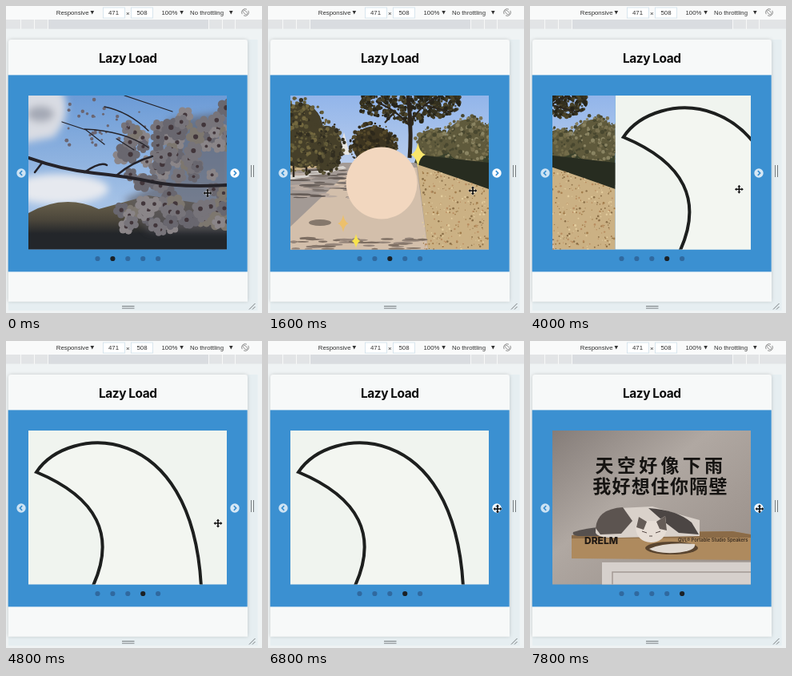
An HTML page that plays this animation: 320x384 px, repeating every 8 s.

```html
<!DOCTYPE html>
<html lang="en">
<head>
<meta charset="utf-8">
<title>Lazy Load</title>
<style>
  html, body { margin: 0; width: 100%; height: 100%; overflow: hidden; background: #fafafa; }
  svg { display: block; width: 100%; height: 100%; }
  text { font-family: Inter, Roboto, sans-serif; }
  .bar text { font: 7.8px "Liberation Sans", Arial, sans-serif; fill: #303030; }
  .mid { text-anchor: middle; }
  .title { font-size: 15.4px; font-weight: 700; letter-spacing: -.4px; }
  .cjk { font: bold 23px "Noto Sans CJK SC", "Noto Sans CJK", sans-serif; text-anchor: middle; fill: #161412; }
</style>
</head>
<body>
<svg viewBox="0 0 320 384">
  <defs>
    <clipPath id="window"><rect x="28" y="112" width="248" height="192.5"/></clipPath>
    <clipPath id="photo"><rect width="248" height="193"/></clipPath>
    <linearGradient id="sky" x2="0" y2="1">
      <stop stop-color="#6c9bd6"/><stop offset=".7" stop-color="#a5c2e6"/>
    </linearGradient>
    <linearGradient id="paleSky" x2="0" y2="1">
      <stop stop-color="#92b5ea"/><stop offset=".45" stop-color="#b9cdec"/>
    </linearGradient>
    <linearGradient id="hill" x2="0" y2="1">
      <stop stop-color="#716850"/><stop offset=".45" stop-color="#4b463b"/><stop offset=".7" stop-color="#23262a"/>
    </linearGradient>
    <linearGradient id="wall" x2="1" y2="1">
      <stop stop-color="#857d79"/><stop offset=".4" stop-color="#b0a8a2"/><stop offset="1" stop-color="#958b85"/>
    </linearGradient>
    <filter id="soft" x="-30%" y="-30%" width="160%" height="160%"><feGaussianBlur stdDeviation="5"/></filter>
    <filter id="shade"><feDropShadow dx="0" dy="0" stdDeviation="2" flood-opacity=".18"/></filter>
    <g id="arrow">
      <circle r="5.7" fill="#fff"/>
      <path d="M-1.2-2.8 1.6 0-1.2 2.8" fill="none" stroke="#3b90d1" stroke-width="1.7"/>
    </g>
    <path id="star" d="M0-1Q.15-.15.62 0 .15.15 0 1-.15.15-.62 0-.15-.15 0-1Z"/>
  </defs>

  <rect width="320" height="384" fill="#f9fafa"/>
  <g class="bar">
    <g fill="#fff" stroke="#cfe0ea" stroke-width=".8">
      <rect x="121.5" y="2" width="27" height="13"/><rect x="156.5" y="2" width="27" height="13"/>
    </g>
    <text x="62.8" y="11">Responsive</text>
    <text class="mid" x="134.5" y="11">471</text>
    <text class="mid" x="152.3" y="12">×</text>
    <text class="mid" x="170" y="11">508</text>
    <text x="194.5" y="11">100%</text>
    <text x="230" y="11">No throttling</text>
    <path d="M105.5 6h4.6l-2.3 4.4zM217.3 6h4.6l-2.3 4.4zM279 6h4.6l-2.3 4.4z" fill="#333"/>
    <g fill="none" stroke="#777" stroke-width=".8">
      <rect x="-1.6" y="-3" width="3.2" height="6" rx=".6" transform="translate(299 8)rotate(-45)"/>
      <path d="M295.2 10.200A4.300 4.300 0 0 1 301 4.200M302.800 5.800A4.300 4.300 0 0 1 297 11.800"/>
    </g>
  </g>

  <rect y="17" width="320" height="367" fill="#eff3f4"/>
  <rect y="17" width="320" height="11.500" fill="#e2e4e6"/>
  <rect x="52" y="17" width="201" height="11.500" fill="#d9dce0"/>
  <path d="M18.500 17v12M35.500 17v12M52.500 17v12M253.500 17v12M270.500 17v12M286.500 17v12" stroke="#f7f8f8"/>
  <path d="M302 42h12.500v339H3v-11h299z" fill="#e6eef1"/>
  <path d="M3 369.500V46q0-4 4-4h291q4 0 4 4v323.500z" fill="#f7f9f9" filter="url(#shade)"/>
  <text class="mid title" x="152.300" y="71" fill="#0b0b0b">Lazy Load</text>
  <path d="M306.500 199v15M309.500 199v15M145 375.500h15.500M145 378h15.500M304 379.500l7.500-7.500M308 379.500l3.500-3.500" stroke="#777d80"/>

  <rect x="2.700" y="86.400" width="299" height="246" fill="#3b90d1"/>
  <g clip-path="url(#window)"><g id="track">

    <g clip-path="url(#photo)">
      <rect width="248" height="193" fill="url(#sky)"/>
      <g filter="url(#soft)">
        <path d="M-10-10H40Q58 22 32 52L-10 60Z" fill="#d9dce3"/>
        <ellipse cx="38" cy="117" rx="62" ry="19" fill="#e6e9ef"/>
        <ellipse cx="15" cy="23" rx="17" ry="10" fill="#a4a9b5"/>
      </g>
      <path d="M0 147Q45 122 88 142L150 125 248 140V193H0Z" fill="url(#hill)"/>
      <path d="M175 30L255 20V170H150L120 130 160 110Z" fill="#5a5860" opacity=".65" filter="url(#soft)"/>
      <g id="blossoms"/>
      <g fill="none" stroke="#252329" stroke-linecap="round">
        <path d="M0 78Q42 93 82 97T155 108 248 112" stroke-width="4"/>
        <path d="M70 96Q90 82 98 87M110 100Q130 83 155 76M18 83L8 96" stroke-width="2.500"/>
        <path d="M70 42Q120 44 150 65M42 33L72 43 95 61M95 14Q125 20 150 44M120 0L180 20M132 68L110 54" stroke-width="1.300"/>
      </g>
    </g>

    <g transform="translate(248)"><g clip-path="url(#photo)">
      <rect width="248" height="193" fill="url(#paleSky)"/>
      <path d="M60 74L67 46 74 74Z" fill="#e8e6e2"/>
      <path d="M0 86H248V193H0Z" fill="#cbb184"/>
      <path d="M0 96L66 84H158L172 193H0Z" fill="#a39a95"/>
      <path d="M78 90H158L172 193H0V164Z" fill="#d3bfab"/>
      <path d="M0 99L66 88 70 91 0 107Z" fill="#d8d4cf"/>
      <g id="shadows"/>
      <ellipse cx="37" cy="159" rx="14" ry="4" fill="#85786c"/>
      <path d="M162 62H248V112Q195 94 155 84Z" fill="#39402b"/>
      <g fill="none" stroke="#2f281f">
        <path d="M103 98V55M4 102V40M20 100V40M40 97V50M52 94V60" stroke-width="2.500"/>
      </g>
      <g id="trees"/>
      <g fill="none" stroke="#2b251d">
        <path d="M149 78Q152 40 147 0" stroke-width="5"/>
        <path d="M149 38Q135 20 108 8M150 34Q165 8 190 0M129 22L118 34M168 12L198 20" stroke-width="2"/>
      </g>
      <path d="M160 74L248 84V117Q195 98 158 86Z" fill="#272c20"/>
      <g id="leaves"/>
      <ellipse cx="114" cy="109.500" rx="44.500" ry="45" fill="#f2d7bf"/>
      <use href="#star" transform="translate(159.500 74)scale(15)" fill="#f8e56c"/>
      <use href="#star" transform="translate(66 160)scale(11)" fill="#ecc06c"/>
      <use href="#star" transform="translate(82 182)scale(9)" fill="#f8e34c"/>
    </g></g>

    <g transform="translate(496)">
      <rect width="248" height="193" fill="#f0f4ef"/>
      <path d="M10 52C50-8 205-15 216 196H80Q125 100 10 52Z" fill="#f3f6f1" stroke="#1d1f1e" stroke-width="4"/>
    </g>

    <g transform="translate(744)"><g clip-path="url(#photo)">
      <rect width="248" height="193" fill="url(#wall)"/>
      <text class="cjk" x="135.500" y="52" letter-spacing="4.300">天空好像下雨</text>
      <text class="cjk" x="135" y="78" letter-spacing="1.200">我好想住你隔壁</text>
      <path d="M24 131L62 128 225 126 248 130V162L24 160Z" fill="#ae8a5e"/>
      <path d="M24 131L62 128 225 126 248 130V134L24 135Z" fill="#8b6b47"/>
      <path d="M26 127Q50 119 75 122V132H32Q24 131 26 127Z" fill="#56504e"/>
      <path d="M54 128Q53 101 84 97L125 95 155 104 184 112 184 132 80 134Q58 135 54 128Z" fill="#d9d1ca"/>
      <path d="M54 122Q56 98 88 96L100 113 86 129 60 130Z" fill="#5c5450"/>
      <path d="M120 97Q155 99 174 115L183 130 158 128 137 112Z" fill="#4c4644"/>
      <path d="M104 122L108 108 117 113H131L141 107 143 124Q139 140 123 140 106 139 104 122Z" fill="#e6ddd5"/>
      <path d="M105 121L108 108 118 114 114 124ZM130 114L141 107 143 125 134 123Z" fill="#655c57"/>
      <path d="M112 126l6 2M129 128l6-2M121 132h4" stroke="#574a46"/>
      <text x="40" y="142" font-size="12" font-weight="800" fill="#201914">DRELM</text>
      <text x="157" y="139" font-size="5.800" font-weight="600" fill="#3b2d20">QVL® Portable Studio Speakers</text>
      <ellipse cx="149" cy="147" rx="33" ry="8" fill="#59442f"/>
      <path d="M121 148Q140 139 178 142 180 151 153 153 130 154 121 148Z" fill="#e1d9d1"/>
      <path d="M62 164H248V193H62Z" fill="#d6d0cc"/>
      <path d="M62 164H248M75 193V177H248" fill="none" stroke="#a39a95" stroke-width="1.500"/>
    </g></g>
  </g></g>

  <use href="#arrow" transform="translate(19 209)scale(-1 1)" opacity=".75"/>
  <use id="next" href="#arrow" transform="translate(286 209)"/>
  <g id="dots"></g>
  <path id="cursor" d="M0-5.500 2-3H.8V-.8H3V-2L5.500 0 3 2V.8H.8V3H2L0 5.500-2 3H-.8V.8H-3V2L-5.500 0-3-2V-.8H-.8V-3H-2Z"
    fill="#111" stroke="#fff" stroke-width=".6" paint-order="stroke"/>
</svg>

<script>
const $ = id => document.getElementById(id);
const LOOP = 8000, STEP = 200, SLIDE_WIDTH = 248, SLIDE_TIME = 500;
const DOT = '#30699f', ACTIVE_DOT = '#1b2126';
const slideStarts = [800, 3800, 6800];
// time, x, y
const cursorPath = [[0, 252, 234], [1000, 256, 231], [3400, 256, 231], [4400, 265, 228],
                    [5600, 265, 228], [6400, 287, 210], [LOOP, 287, 210]];

let seed = 71;
const rand = (min, max) => {
  seed = seed * 16807 % 2147483647;
  return min + (max - min) * seed / 2147483647;
};
const pick = list => list[Math.floor(rand(0, list.length))];
const repeat = (count, draw) => Array.from({ length: count }, (_, i) => draw(i)).join('');
const ellipse = (x, y, rx, ry, fill) =>
  `<ellipse cx="${x.toFixed(1)}" cy="${y.toFixed(1)}" rx="${rx.toFixed(1)}" ry="${ry.toFixed(1)}" fill="${fill}"/>`;
const circle = (x, y, r, fill) => ellipse(x, y, r, r, fill);

function flower() {
  const x = 250 - 138 * rand(0, 1) ** 1.25, y = rand(x > 190 ? 5 : 38, 168);
  const r = rand(7, 12), turn = rand(0, 6), color = pick(['#77747a', '#8a8588', '#69676f', '#7d776f']);
  return repeat(5, i => {
    const a = turn + i * Math.PI * 0.4;
    return circle(x + r * 0.6 * Math.cos(a), y + r * 0.6 * Math.sin(a), r * 0.46, color);
  }) + circle(x, y, r * 0.27, '#42363b');
}

// Solid core with a ragged scatter of leaves around it
function crown(cx, cy, rx, ry, count, colors) {
  return ellipse(cx, cy, rx * 0.88, ry * 0.88, colors[0]) + repeat(count, () => {
    const a = rand(0, 2 * Math.PI), d = Math.sqrt(rand(0, 1.1));
    return circle(cx + rx * d * Math.cos(a), cy + ry * d * Math.sin(a), rand(0.8, 2.8), pick(colors));
  });
}

$('blossoms').innerHTML =
  repeat(95, flower) +
  repeat(35, () => circle(rand(40, 150), rand(5, 62), rand(1, 2.5), '#6b6672'));
$('trees').innerHTML =
  crown(178, 60, 22, 20, 120, ['#5f5a3c', '#736c49', '#48472f']) +
  crown(223, 57, 34, 31, 240, ['#5f5a3c', '#797150', '#48472f', '#8a8462']) +
  crown(45, 66, 22, 32, 150, ['#453f29', '#5e5637', '#322e20']) +
  crown(14, 50, 32, 46, 300, ['#453f29', '#625b38', '#322e20', '#73683f']) +
  crown(104, 63, 29, 28, 220, ['#3c3420', '#55492a', '#2d281b']) +
  repeat(420, () => {
    const x = 150 + rand(-1, 1) * 62;
    return circle(x, rand(0, 1) ** 1.2 * (36 - Math.abs(x - 150) * 0.25), rand(0.8, 3), pick(['#34301f', '#262419', '#4a4329']));
  });
$('shadows').innerHTML = repeat(60, () => {
  const y = rand(90, 128);
  return ellipse(rand(0, 100), y, rand(5, 16), rand(0.5, 1.6), pick(['#7b716b', '#655c57', '#b9aaa0']));
}) + repeat(40, () => ellipse(rand(0, 170), rand(178, 193), rand(4, 13), rand(0.7, 1.8), pick(['#7d6e62', '#95857a'])));
$('leaves').innerHTML = repeat(260, () => {
  const y = rand(95, 193);
  return circle(rand(165, 165 + Math.min(83, (y - 88) * 2.8)), y, rand(0.5, 1.4), pick(['#a27d4c', '#e3cd9e', '#8c7048', '#b98e61']));
});
$('dots').innerHTML = repeat(5, i => circle(114.5 + 18.9 * i, 316, 3.1, DOT));

// CSS "ease": cubic-bezier(.25, .1, .25, 1), solved by bisection
function ease(p) {
  if (p <= 0) return 0;
  if (p >= 1) return 1;
  const bezier = (s, a, b) => 3 * a * s * (1 - s) ** 2 + 3 * b * s * s * (1 - s) + s ** 3;
  let low = 0, high = 1;
  for (let i = 0; i < 24; i++) {
    const s = (low + high) / 2;
    if (bezier(s, 0.25, 0.25) < p) low = s; else high = s;
  }
  return bezier(low, 0.1, 1);
}

function cursorAt(t) {
  const i = cursorPath.findIndex(point => point[0] > t);
  const [t0, x0, y0] = cursorPath[i - 1], [t1, x1, y1] = cursorPath[i];
  const p = (t - t0) / (t1 - t0);
  return [x0 + (x1 - x0) * p, y0 + (y1 - y0) * p];
}

function render(now) {
  const t = Math.floor(now % LOOP / STEP) * STEP;
  const position = slideStarts.reduce((sum, start) => sum + ease((t - start) / SLIDE_TIME), 0);
  const active = 1 + slideStarts.filter(start => t > start).length;
  const [x, y] = cursorAt(t);
  $('track').setAttribute('transform', `translate(${28 - position * SLIDE_WIDTH} 112)`);
  $('cursor').setAttribute('transform', `translate(${x} ${y})`);
  $('next').setAttribute('opacity', t > 3800 && x < 280 ? 0.8 : 1);
  [...$('dots').children].forEach((dot, i) => dot.setAttribute('fill', i === active ? ACTIVE_DOT : DOT));
}

const begin = performance.now();
function tick() {
  render(performance.now() - begin);
  requestAnimationFrame(tick);
}
tick();
</script>
</body>
</html>
```
